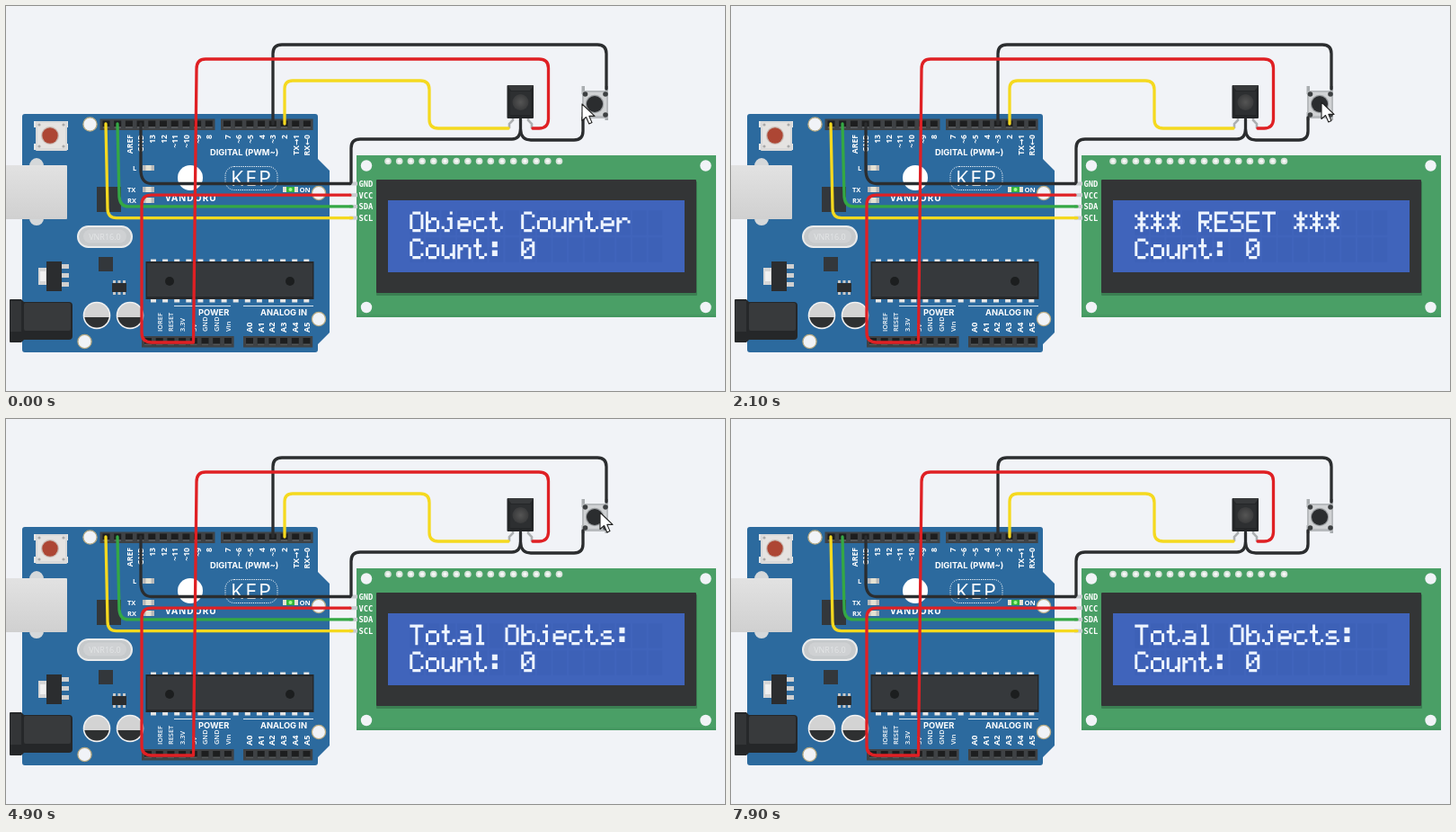
Write an HTML page that moves like this. It is 800 px wide and 428 px high and loops after 8000 ms.

```html
<!DOCTYPE html>
<html lang="en">
<head>
<meta charset="utf-8">
<title>Object counter circuit</title>
<style>
  html, body { margin: 0; width: 100%; height: 100%; overflow: hidden; background: #f1f3f7; }
  svg { display: block; width: 100%; height: 100%; }
  text { font-family: "Open Sans", "DejaVu Sans", sans-serif; fill: #fff; }
  .semi { font-weight: 600; }
  .bold { font-weight: 700; }
  .title { font-family: Inter, sans-serif; font-weight: 700; }
  .mono { font-family: "DejaVu Sans Mono", monospace; font-weight: 700; }
  .wire { fill: none; stroke-width: 3.3; stroke-linecap: round; stroke-linejoin: round; }
</style>
</head>
<body>
<svg id="stage" viewBox="0 0 800 428">
  <defs>
    <linearGradient id="usbMetal" x2="0" y2="1">
      <stop stop-color="#e2e2e2"/><stop offset="1" stop-color="#d0d0d0"/>
    </linearGradient>
    <radialGradient id="dome"><stop stop-color="#555"/><stop offset="1" stop-color="#3a3b3c"/></radialGradient>
  </defs>
  <g id="board"></g>
  <g id="display"></g>
  <g id="parts"></g>
  <g id="wires"></g>
  <path id="letters" fill="#edf4ff" role="img"/>
  <path id="cursor" d="M0 0V18.5L4.5 14.5 7.8 22 11 20.6 7.8 13.4H14Z" fill="#fff" stroke="#222" stroke-width="1.1" stroke-linejoin="round"/>
</svg>
<script>
const $ = id => document.getElementById(id);
const times = (n, f) => Array.from({ length: n }, (_, i) => f(i)).join('');
const rect = (x, y, w, h, fill, more = '') =>
  `<rect x="${x}" y="${y}" width="${w}" height="${h}" fill="${fill}" ${more}/>`;
const disc = (x, y, r, fill, more = '') => `<circle cx="${x}" cy="${y}" r="${r}" fill="${fill}" ${more}/>`;
const path = (d, fill, more = '') => `<path d="${d}" fill="${fill}" ${more}/>`;
const label = (x, y, size, str, more = 'class="bold"') =>
  `<text x="${x}" y="${y}" font-size="${size}" ${more}>${str}</text>`;
const upright = (x, y, size, str, more) =>
  `<text transform="translate(${x} ${y}) rotate(-90)" font-size="${size}" ${more}>${str}</text>`;

const PITCH = 12.7, BG = '#f1f3f7', DARK = '#2b2d2f';

function header(x, y, pins) {
  return rect(x - 7, y - 6, pins * PITCH + 1, 12.5, '#3f4245') +
    times(pins, i => rect(x - 4 + i * PITCH, y - 4, 8, 8.5, '#1d1e1f') +
      rect(x - 4 + i * PITCH, y + 2.5, 8, 2, '#55585b'));
}

function chipLed(y) {
  return rect(152, y - 3, 13, 6, '#e4e1d2') + rect(152, y - 3, 3.5, 6, '#b9b9b9') + rect(161.5, y - 3, 3.5, 6, '#b9b9b9');
}

function capacitor(x) {
  return disc(x, 344, 15.3, '#f2f2f2') + disc(x, 344, 13.8, '#d3d3d3') +
    path(`M${x - 13.6} 346H${x + 13.6}A13.8 13.8 0 0 1 ${x - 13.6} 346Z`, '#2e3031');
}

function drawBoard() {
  const edge = 'M21 120H344Q347 120 347 123V170L360 183V363L347 376V382Q347 385 344 385H21Q18 385 18 382V123Q18 120 21 120Z';
  const top = ['AREF', 'GND', '13', '12', '~11', '~10', '~9', '8'];
  const top2 = ['7', '~6', '~5', '4', '~3', '2', 'TX→1', 'RX←0'];
  const power = ['IOREF', 'RESET', '3.3V', '5V', 'GND', 'GND', 'Vin'];
  const end = 'class="bold" text-anchor="end"';
  return path(edge, '#2c6a9e') +
    [[93.5, 131.5], [348, 208], [348, 348], [87.5, 373]].map(([x, y]) =>
      disc(x, y, 7.6, BG, 'stroke="#b8ab84" stroke-width="1.3"')).join('') +
    // reset button
    times(4, i => rect(i % 2 ? 65 : 31, i < 2 ? 128 : 153, 4, 7, '#e8e8e8')) +
    rect(33, 128, 35, 33, '#d9d9d9', 'rx="1"') + rect(35, 130, 31, 28, '#e5e3e1') +
    times(4, i => disc(i % 2 ? 64 : 37, i < 2 ? 132 : 156, 1.6, '#a9a9a9')) +
    disc(49, 144, 10, '#c9b9b2') + disc(49, 144, 8.7, '#ad4634') +
    // usb port
    `<ellipse cx="34" cy="178" rx="8" ry="9" fill="#d5d8da"/><ellipse cx="34" cy="236" rx="8" ry="8" fill="#d5d8da"/>` +
    rect(-4, 177, 72, 60, 'url(#usbMetal)', 'rx="1"') +
    // power jack
    path('M5 326H17L20 329H70Q74 329 74 333V367Q74 371 70 371H20L17 374H5Q4 374 4 373V327Q4 326 5 326Z', '#252729') +
    rect(20, 330, 52, 31, '#383a3c', 'rx="2"') + rect(5, 328, 12, 34, '#333537') +
    // small parts
    rect(101, 201, 27, 28, '#33373b') + rect(103, 279, 16, 16, '#33373b') +
    rect(36, 291, 10, 19, '#d7d7d7') + rect(38, 295, 6, 11, '#f1f1f1') +
    times(3, i => rect(60, 287 + i * 10, 10, 5, '#d0d0d0')) + rect(45, 284, 17, 33, '#2b2d2f') +
    times(3, i => rect(119 + i * 5.5, 305, 3, 16, '#c9c9c9')) + rect(118, 308, 16, 10, '#2b2d2f') +
    rect(80, 245, 60, 23, '#c6c9cb', 'rx="11.5" stroke="#e9ebec" stroke-width="2"') +
    rect(86, 248.5, 48, 15, '#cfd1d3', 'rx="7.5"') +
    label(110, 260, 9, 'VNR16.0', 'text-anchor="middle" style="fill:#e3e5e6"') +
    capacitor(101) + capacitor(138) +
    // top headers
    header(111.5, 131.5, 10) + header(246, 131.5, 8) +
    top.map((s, i) => upright(140.5 + i * PITCH, 143, 8.6, s, end)).join('') +
    top2.map((s, i) => upright(249.5 + i * PITCH, 143, 8.6, s, end)).join('') +
    label(227, 166, 9.3, 'DIGITAL (PWM~)', 'class="title"') +
    // bottom headers
    header(158, 373, 8) + header(271, 373, 6) +
    power.map((s, i) => upright(173.5 + i * PITCH, 362, 7.4, s, 'class="semi"')).join('') +
    times(6, i => upright(274 + i * PITCH, 363, 9, 'A' + i, 'class="bold"')) +
    rect(187, 333, 63, 1, '#dce8f2') + rect(264, 333, 78, 1, '#dce8f2') +
    label(214, 344, 9.3, 'POWER', 'class="title"') + label(283, 344, 9.3, 'ANALOG IN', 'class="title"') +
    // main chip
    times(14, i => rect(161 + i * 13.1, 281.5, 6, 48, '#e6e6e6')) +
    rect(155.5, 284, 187, 42, '#26282a') + rect(157, 286, 184, 37, '#36393c') +
    disc(182, 306, 5, '#1c1e1f') + disc(316, 306, 5, '#1c1e1f') +
    // leds and lettering
    chipLed(180) + chipLed(204) + chipLed(216) +
    label(141, 183, 7.5, 'L') + label(135, 207, 7.5, 'TX') + label(135, 219, 7.5, 'RX') +
    rect(308, 201, 17, 6, '#e4e1d2') + rect(312, 201, 9, 6, '#34b53c') + disc(316.5, 204, 2, '#a4ff8a') +
    label(326.5, 207, 7.7, 'ON') +
    disc(205, 191, 14, '#fff') + label(177, 217, 10.4, 'VANDORU', 'class="bold" letter-spacing=".7"') +
    rect(244, 178.5, 58, 26, 'none', 'rx="10" stroke="#fff" stroke-width="1" stroke-dasharray="1.2 1.2"') +
    label(273.5, 199.5, 23, 'KEP', 'text-anchor="middle" letter-spacing="2"');
}

const CELL = 17.7, LEFT = 449.3, TOP = 228.5, ROW = 30, DOT_X = 3.02, DOT_Y = 3.25;

function drawDisplay() {
  return rect(390, 166, 400, 180, '#4a9f66') + rect(390, 343, 400, 3, '#459861') +
    times(4, i => disc(i % 2 ? 778.5 : 401, i < 2 ? 177.5 : 335, 6.2, BG)) +
    times(16, i => disc(425 + i * PITCH, 172.5, 3.8, '#d7e2da') + disc(425 + i * PITCH, 172.5, 2, '#f6f8f6')) +
    rect(412, 195, 357, 127, '#3b7f52', 'rx="1"') + rect(412, 193, 356, 126, '#333536', 'rx="1"') +
    rect(425, 216, 330, 80, '#4064bb') +
    times(32, i => rect(LEFT + i % 16 * CELL, TOP - 1 + (i > 15 ? ROW : 0), 15.4, 27, '#3d61b7')) +
    ['GND', 'VCC', 'SDA', 'SCL'].map((s, i) =>
      rect(382, 195.5 + i * PITCH, 9, 4, '#c7cbce') +
      label(392.5, 201 + i * PITCH, 8.8, s, 'class="mono"')).join('');
}

function drawParts() {
  const leg = 'stroke="#acafb1" stroke-width="2.6"';
  return path('M564 124V127L560 131V136M572.5 124V137M581 124V127L585 131V136', 'none', leg) +
    rect(557.5, 88, 29.5, 37, '#242628', 'rx="1"') + path('M558 88H587L583 94H562Z', '#37393b') +
    rect(561, 95, 23, 26, '#2d2f31') + disc(572.5, 107, 9, 'url(#dome)') +
    times(4, i => rect(i % 2 ? 666.5 : 640.5, i < 2 ? 89 : 118, 3.5, 9, '#a9adb0')) +
    rect(641, 94, 29, 31, '#b7babd', 'rx="1"') + rect(643, 96, 25, 26, '#d0d2d4') +
    times(4, i => disc(i % 2 ? 667 : 644.5, i < 2 ? 98 : 121, 2.8, '#3d4042')) +
    disc(655, 109, 10.2, '#9a9da0') + disc(655, 109, 9, '#2b2d2f');
}

function drawWires() {
  const RED = '#df2024', YELLOW = '#f5d91f', GREEN = '#34a844';
  const list = [
    [DARK, 'M150 131V184Q151 197.5 162 197.5H383'],
    [GREEN, 'M124 131L126 212Q127 222.9 136 222.9H385'],
    [YELLOW, 'M111 131L113 225Q113 235.6 123 235.6H385'],
    [DARK, 'M384 196V158Q384 148 394 148H563Q572 148 572.5 137V126'],
    [DARK, 'M572.5 137Q573 149 584 149H632Q642 149 642 139V124'],
    [DARK, 'M297 131V53Q297 43 307 43H658Q668 43 668 53V92'],
    [YELLOW, 'M310 131V92Q310 83 319 83H461Q471 83 471 93V126Q471 136 481 136H559'],
    [RED, 'M383 210.2H162Q151 210.2 151 221V363Q151 374 162 374H208.5L212 70Q212 59 222 59H593Q603.5 59 603.5 69V126Q603 136 593 136H586'],
  ];
  return list.map(([color, d]) => `<path class="wire" d="${d}" stroke="${color}"/>`).join('');
}

// Strokes on a 5 by 7 dot grid, each point written as column and row.
const GLYPHS = {
  O: '0105 1030 4145 1636', b: '0006 13223243453616', j: '30 223235261605',
  e: '1232434404 03051636', c: '32120305163645', t: '1015263645 0222',
  C: '4130100105163645', o: '123243453616050312', u: '0205162635 4246',
  n: '0206 1322324346', r: '0206 13223243', ':': '1121 1222 1424 1525',
  0: '103041453616050110 1432', '*': '2026 0145 4105',
  R: '0006 103041423303 2446', E: '0006 1040 1333 1646', S: '40100102133344453606',
  T: '0040 2126', a: '1232434616051444', l: '1020261636', s: '3212031434453606',
};

function glyphDots(ch) {
  const dots = new Set();
  for (const stroke of (GLYPHS[ch] || '').split(' ').filter(Boolean)) {
    const pts = stroke.match(/../g).map(p => [+p[0], +p[1]]);
    pts.forEach(([x, y], i) => {
      const [px, py] = pts[Math.max(0, i - 1)];
      const n = Math.max(Math.abs(x - px), Math.abs(y - py), 1);
      for (let k = 0; k <= n; k++) dots.add(`${px + (x - px) * k / n},${py + (y - py) * k / n}`);
    });
  }
  return [...dots].map(d => d.split(',').map(Number));
}

const linePath = (str, row) => [...str].map((ch, i) => glyphDots(ch).map(([x, y]) =>
  `M${(LEFT + i * CELL + x * DOT_X).toFixed(2)} ${(TOP + row * ROW + y * DOT_Y).toFixed(2)}h3v3.2h-3z`
).join('')).join('');

const LOOP = 8000, CHAR_MS = 60;
const RESET = '*** RESET ***', TOTAL = 'Total Objects:';
const WRITES = [[1250, RESET], [2570, TOTAL], [5050, RESET], [6370, TOTAL]];

// Each message overwrites the previous one, character by character.
function titleAt(t) {
  let text = 'Object Counter';
  for (const [start, next] of WRITES) {
    if (t < start) break;
    const n = Math.floor((t - start) / CHAR_MS) + 1;
    text = next.padEnd(16).slice(0, n) + text.padEnd(16).slice(n);
  }
  return text.trimEnd();
}

// time, x, y
const MOVES = [
  [0, 641, 109], [400, 657, 107], [2500, 657, 107], [3200, 571, 101],
  [4000, 571, 101], [4700, 661, 104], [5500, 661, 104], [6200, 810, 130], [LOOP, 810, 130],
];

function cursorAt(t) {
  const i = MOVES.findIndex(m => m[0] > t);
  const [t0, x0, y0] = MOVES[i - 1], [t1, x1, y1] = MOVES[i];
  const p = (t - t0) / (t1 - t0), e = p * p * (3 - 2 * p);
  return [x0 + (x1 - x0) * e, y0 + (y1 - y0) * e];
}

$('board').innerHTML = drawBoard();
$('display').innerHTML = drawDisplay();
$('parts').innerHTML = drawParts();
$('wires').innerHTML = drawWires();

const countPath = linePath('Count: 0', 1);
const begin = performance.now();
let shown;

function frame() {
  const t = Math.floor((performance.now() - begin) % LOOP / 100) * 100;
  const title = titleAt(t);
  if (title !== shown) {
    $('letters').setAttribute('d', linePath(title, 0) + countPath);
    $('letters').setAttribute('aria-label', title + ', Count: 0');
    shown = title;
  }
  $('cursor').setAttribute('transform', `translate(${cursorAt(t).join(' ')})`);
  requestAnimationFrame(frame);
}
frame();
</script>
</body>
</html>
```
